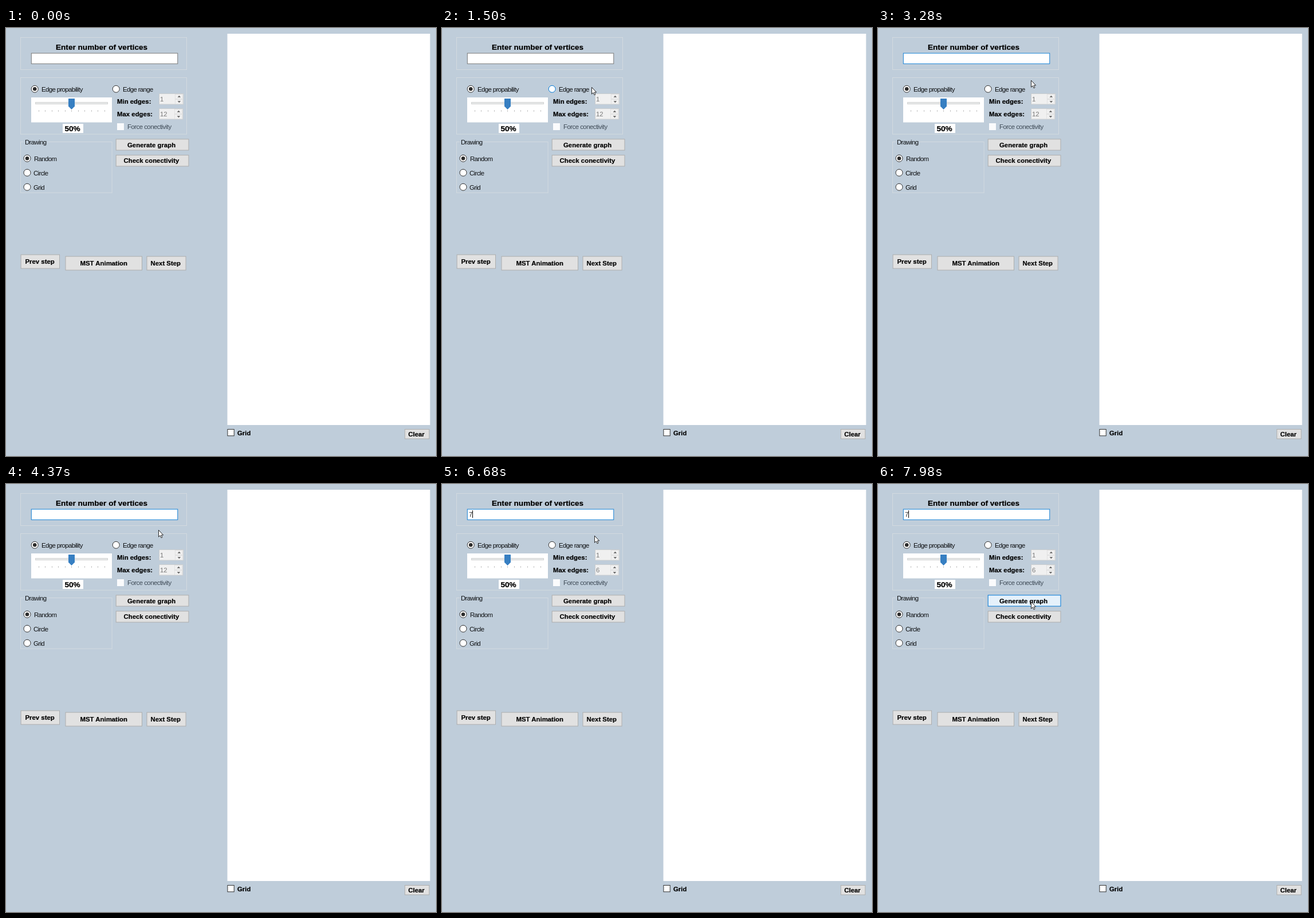
Recreate the animation shown at these times as an HTML page. Size 751x746 px, loop 8000 ms.

```html
<!DOCTYPE html>
<html lang="en">
<head>
<meta charset="utf-8">
<title>Graph form</title>
<style>
html, body { margin: 0; width: 100%; height: 100%; overflow: hidden; background: #bfcdda; }
svg { display: block; width: 751px; height: 746px; }
text { font: 11.4px "Liberation Sans", Arial, sans-serif; letter-spacing: -.62px; fill: #0c0e10; }
.bold { font-weight: bold; letter-spacing: 0; fill: #000; stroke: #000; stroke-width: .2px; }
.big { font-size: 13.6px; }
.dim { fill: #7a7a7a; letter-spacing: -.2px; }
.typed { fill: #333; }
.off { fill: #3f4b57; letter-spacing: -.52px; }
.group { fill: none; stroke: #d3dae0; }
.btn { fill: #e1e1e1; stroke: #adadad; }
.btn.hot { fill: #e5f1fb; stroke: #0078d7; }
.box { fill: #fff; stroke: #7a7a7a; }
.box.hot { stroke: #171717; }
.box.focus { stroke: #1883d7; }
.ring { fill: #fff; stroke: #333; }
.ring.hot { stroke: #0078d7; }
</style>
</head>
<body>
<svg id="stage" viewBox="0 0 751 746"></svg>
<script>
const stage = document.getElementById("stage");

function add(tag, attrs, content) {
  const el = document.createElementNS("http://www.w3.org/2000/svg", tag);
  for (const name in attrs) el.setAttribute(name, attrs[name]);
  if (content) el.textContent = content;
  return stage.appendChild(el);
}
const label = (x, y, content, cls = "") => add("text", { x, y, class: cls }, content);
const fill = (x, y, width, height, color) => add("rect", { x, y, width, height, fill: color });
// One-pixel outline spanning the given outer edges
const frame = (x, y, right, bottom, cls) =>
  add("rect", { x: x + .5, y: y + .5, width: right - x - 1, height: bottom - y - 1, class: cls });

function button(x, y, right, bottom, tx, ty, caption) {
  const face = frame(x, y, right, bottom, "btn");
  label(tx, ty, caption, "bold");
  return face;
}
function radio(x, y, caption, tx, ty, on) {
  const ring = add("circle", { cx: x, cy: y, r: 6, class: "ring" });
  if (on) add("circle", { cx: x, cy: y, r: 3.3, fill: "#2b2b2b" });
  label(tx, ty, caption);
  return ring;
}
function spinner(x, y, right, value) {
  add("rect", { x: x + .5, y: y + .5, width: right - x - 1, height: 18.5, fill: "#f0f0f0", stroke: "#c9cccf" });
  const mid = right - 8;
  for (const side of [-1, 1]) {
    const cy = y + 10 + side * 4.5;
    add("rect", { x: right - 15, y: cy - 4, width: 13, height: 8, fill: "#f0f0f0", stroke: "#dcdcdc", "stroke-width": .7 });
    add("path", { d: `M${mid - 2.8} ${cy - side * 1.3}h5.6l-2.8 ${side * 3}z`, fill: "#606060" });
  }
  return label(x + 2, y + 14, value, "dim");
}

frame(25, 16, 316, 73, "group");
label(87, 38, "Enter number of vertices", "bold big");
const box = frame(43.8, 43.5, 300.3, 62.8, "box");
const typed = label(47, 57, "", "typed");
const caret = fill(47, 46, 1, 13, "#000");

frame(25, 86, 316, 185.6, "group");
radio(50.2, 106.3, "Edge propability", 62, 111, true);
const rangeRing = radio(192.2, 106.3, "Edge range", 204, 111);
fill(44, 121, 141, 43.5, "#fff");
add("rect", { x: 51.5, y: 129.5, width: 126, height: 3, fill: "#e7eaea", stroke: "#d3d3d3" });
for (let i = 0; i < 11; i++) fill(Math.round(56.5 + i * 11.5), 143, 1, 3, "#c2c2c2");
add("path", { d: "M109 123h11v13.5l-5.5 5.5l-5.5 -5.5z", fill: "#377fc2" });
fill(99, 167, 36, 16, "#fff");
label(102.5, 180, "50%", "bold big");
label(194, 132, "Min edges:", "bold");
label(194, 154, "Max edges:", "bold");
spinner(267, 114, 310.4, "1");
const maxEdges = spinner(267, 140, 309.5, "12");
fill(194, 166, 12, 12, "#fafbfc");
label(212, 176, "Force conectivity", "off");

frame(25, 198, 185.6, 287.6, "group");
fill(31, 197, 42, 3, "#bfcdda");
label(33, 203, "Drawing");
radio(37, 227.2, "Random", 49, 232, true);
radio(37, 252.2, "Circle", 48, 257);
radio(37, 277.2, "Grid", 48, 281.5);

const generate = button(191.7, 193.3, 319.5, 213.5, 212, 207.6, "Generate graph");
const check = button(191.7, 221.2, 319.5, 241.4, 205.5, 235.4, "Check conectivity");
button(25.6, 394.6, 94, 419.6, 33.5, 411, "Prev step");
button(103.5, 397.6, 238, 422.5, 129.5, 414, "MST Animation");
button(245.5, 397.6, 314.6, 422.5, 252.5, 414, "Next Step");

fill(386.6, 10, 354, 682, "#fff");
add("rect", { x: 387, y: 699.5, width: 11.3, height: 11.3, fill: "#fff", stroke: "#333" });
label(404, 709.6, "Grid", "bold");
button(696.2, 699, 739.6, 716.5, 702.5, 712, "Clear");

const arrow = add("path", {
  d: "M.5 .3V12.2L3.2 9.7L5.1 13.8L7 12.9L5.1 9H8.7Z",
  fill: "#fff", stroke: "#111", "stroke-width": .9
});
const beam = add("path", {
  d: "M-2.5 -5.5H-.5M.5 -5.5H2.5M0 -5V6M-2.5 6.5H-.5M.5 6.5H2.5",
  fill: "none", stroke: "#111", "stroke-width": 1
});

// Pointer moves: first step, last step, step count, end x, end y
const start = [648, 782];
const moves = [
  [330, 1080, 12, 258, 226],
  [1150, 1500, 6, 261, 103],
  [1580, 1930, 6, 265, 53],
  [1980, 2320, 6, 264, 55],
  [2660, 3280, 10, 267, 91],
  [3820, 4080, 5, 266, 80],
  [4770, 4890, 2, 266, 78],
  [5090, 5350, 4, 266, 84],
  [6140, 6220, 2, 266, 88],
  [6680, 6680, 1, 266, 90],
  [6740, 7080, 6, 276, 130],
  [7148, 7420, 5, 274, 169],
  [7490, 7980, 8, 267, 205]
];
const focusTime = 2116, typeTime = 6410;
const caretFlips = [focusTime, 3280, 3820, 4370, 4890, 5350, 5950, 6950, 7490];

function pointer(t) {
  let [x, y] = start;
  for (const [from, to, count, endX, endY] of moves) {
    if (t < from) break;
    const gap = count > 1 ? (to - from) / (count - 1) : 1;
    const done = Math.min(count, Math.floor((t - from) / gap + 1e-6) + 1) / count;
    x += (endX - x) * done;
    y += (endY - y) * done;
  }
  return [Math.round(x), Math.round(y)];
}

function draw(t) {
  const [x, y] = pointer(t);
  const over = (left, top, right, bottom) => x >= left && x < right && y >= top && y < bottom;
  const inBox = over(44, 43, 301, 63);
  const hasText = t >= typeTime;

  generate.classList.toggle("hot", over(192, 193, 320, 214));
  check.classList.toggle("hot", over(192, 221, 320, 242));
  rangeRing.classList.toggle("hot", over(186, 98, 262, 115));
  box.classList.toggle("hot", inBox);
  box.classList.toggle("focus", t >= focusTime);

  typed.textContent = hasText ? "7" : "";
  maxEdges.textContent = hasText ? "6" : "12";
  caret.setAttribute("x", hasText ? 53 : 47);
  caret.style.display = caretFlips.filter(flip => t >= flip).length % 2 ? "" : "none";

  arrow.style.display = inBox || t < moves[0][0] ? "none" : "";
  beam.style.display = inBox ? "" : "none";
  arrow.setAttribute("transform", `translate(${x} ${y})`);
  beam.setAttribute("transform", `translate(${x + .5} ${y + .5})`);
}

const begin = performance.now();
function tick() {
  draw((performance.now() - begin) % 8000);
  requestAnimationFrame(tick);
}
draw(0);
requestAnimationFrame(tick);
</script>
</body>
</html>
```
